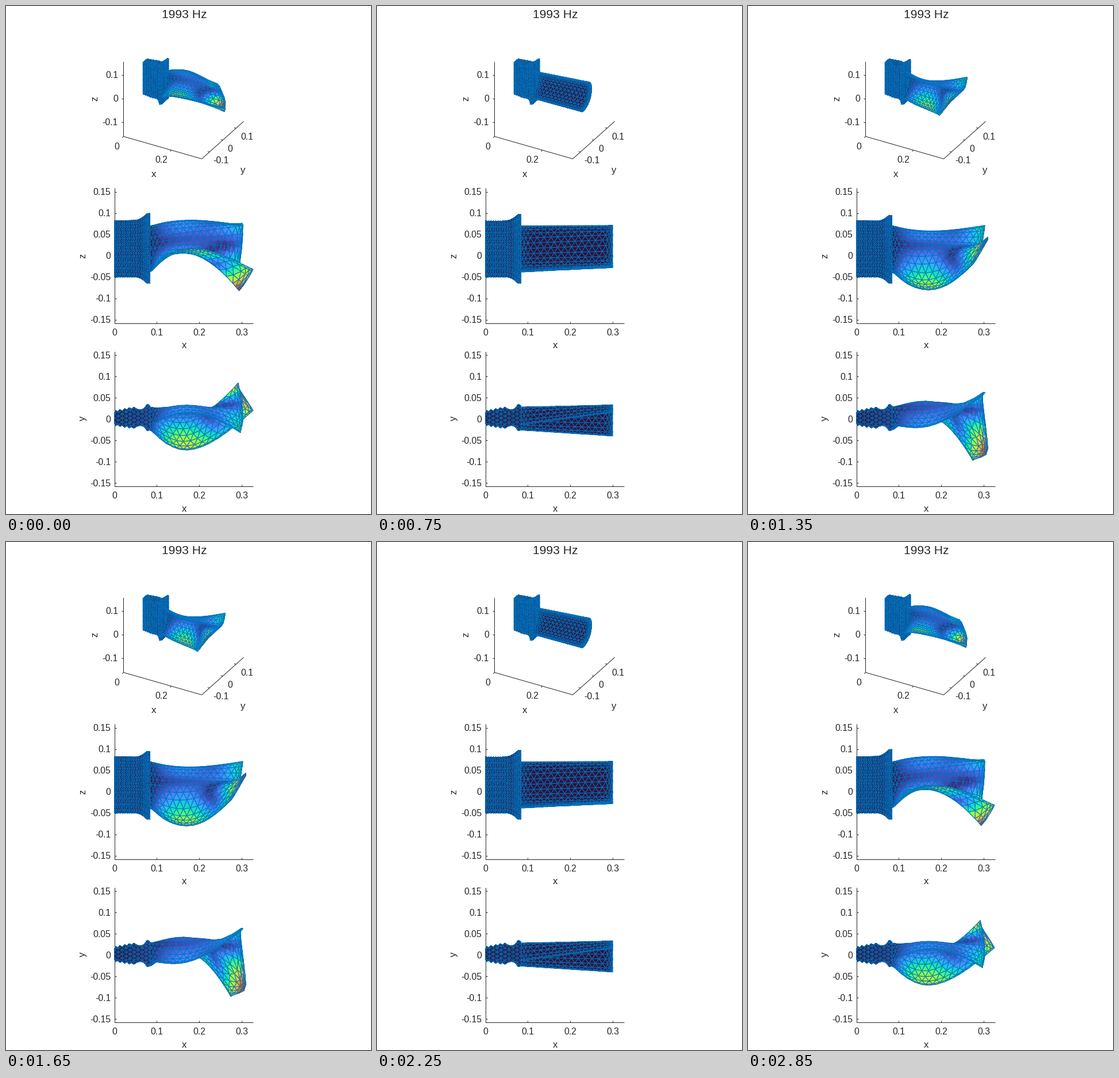
A matplotlib script for the animation above (3000 ms loop, 635 px wide and 882 px high).

```python
import numpy as np
import matplotlib.pyplot as plt
from matplotlib.animation import FuncAnimation
from matplotlib.collections import PolyCollection
from matplotlib.colors import to_rgba
from matplotlib.tri import Triangulation

W, H, DPI = 635, 882, 64
FRAMES, INTERVAL = 20, 150
PT = 72 / DPI  # points per pixel
INK = "#262626"
EDGE = to_rgba("#0072BD")
CLIM = 0.104  # displacement at the top of the colour map

plt.rcParams["font.family"] = "Liberation Sans"
fig = plt.figure(figsize=(W / DPI, H / DPI), dpi=DPI, facecolor="white")
ax = fig.add_axes([0, 0, 1, 1])
ax.set_xlim(0, W)
ax.set_ylim(H, 0)
ax.axis("off")


# ---------- geometry: root block ----------

X_ROOT = np.array([0, .003, .008, .013, .019, .024, .030, .035, .041, .046,
                   .052, .058, .064, .069, .073, .077, .080, .084])
HALF = np.array([.013, .018, .015, .020, .017, .022, .019, .024, .021, .025,
                 .021, .019, .019, .021, .025, .031, .031, .027])


def half_width(x):
    return np.interp(x, X_ROOT, HALF)


def mid_y(x):
    return 0.002 + 0.018 * x


def flare(x):
    return 0.0147 * np.clip((x - .048) / .029, 0, 1) ** 2


def z_top(x):
    return 0.082 + flare(x)


def z_low(x):
    return -0.050 - flare(x)


def grid(p):
    """Triangles of a (rows, cols, 3) lattice with zigzag diagonals."""
    rows, cols = p.shape[:2]
    n = np.arange(rows * cols).reshape(rows, cols)
    a, b, c, d = n[:-1, :-1], n[:-1, 1:], n[1:, 1:], n[1:, :-1]
    odd = (np.arange(rows - 1) % 2 == 1)[:, None]
    first = np.stack([a, b, np.where(odd, c, d)], -1).reshape(-1, 3)
    second = np.stack([np.where(odd, a, b), c, d], -1).reshape(-1, 3)
    return p.reshape(-1, 3), np.vstack([first, second])


def root_side():
    x, f = np.meshgrid(X_ROOT, np.linspace(0, 1, 20))
    z = z_low(x) + f * (z_top(x) - z_low(x))
    return grid(np.stack([x, mid_y(x) - half_width(x), z], -1))


def root_top():
    pts = [(x, mid_y(x) + k * half_width(x)) for x in X_ROOT for k in (-1, 1)]
    for i, x in enumerate(np.linspace(0, .084, 10)):
        for y in np.arange(-3, 4) * .0095 + .002 + .00475 * (i % 2):
            if abs(y - mid_y(x)) < half_width(x) - .003:
                pts.append((x, y))
    pts = np.array(pts)
    tris = Triangulation(*pts.T).triangles
    cx, cy = pts[tris].mean(1).T
    tris = tris[np.abs(cy - mid_y(cx)) <= half_width(cx) + 1e-6]
    u, v = pts[tris[:, 1]] - pts[tris[:, 0]], pts[tris[:, 2]] - pts[tris[:, 0]]
    flip = u[:, 0] * v[:, 1] < u[:, 1] * v[:, 0]
    tris[flip] = tris[flip][:, ::-1]
    return np.column_stack([pts, z_top(pts[:, 0])]), tris


def root_end():
    x = .084
    y = mid_y(x) + half_width(x) * np.linspace(-1, 1, 8)
    yy, zz = np.meshgrid(y, np.linspace(z_low(x), z_top(x), 18))
    return grid(np.stack([np.full_like(yy, x), yy, zz], -1))


def root_mode(p):
    d = np.zeros_like(p)
    d[:, 2] = .0025 * (p[:, 0] / .084) ** 2 * np.clip(p[:, 2] / .08, 0, 1)
    return d


# ---------- geometry: blade ----------

X0, X1 = .083, .300
S_SHAPE = [0, .3, .6, 1]
BASE_Y = np.polyfit(S_SHAPE, [-.026, .008, .024, -.014], 3)
BASE_Z = np.polyfit(S_SHAPE, [-.038, -.018, .015, .070], 3)
TIP_Y = np.polyfit(S_SHAPE, [-.040, .006, .028, .016], 3)
TIP_Z = np.polyfit(S_SHAPE, [-.026, -.013, .022, .071], 3)


def blade_point(x, s, side):
    u = (x - X0) / (X1 - X0)

    def blend(base, tip):
        return (1 - u) * np.polyval(base, s) + u * np.polyval(tip, s)

    ty = blend(np.polyder(BASE_Y), np.polyder(TIP_Y))
    tz = blend(np.polyder(BASE_Z), np.polyder(TIP_Z))
    h = side * .0042 * (4 * s * (1 - s)) ** .45 / np.hypot(ty, tz)
    return np.stack([x, blend(BASE_Y, TIP_Y) - h * tz,
                     blend(BASE_Z, TIP_Z) + h * ty], -1)


# Displacement along the chord, at mid span and at the tip.
S_MODE = np.linspace(0, 1, 6)
MID = np.array([[0, -.044, .050], [0, -.034, .038], [0, -.022, .016],
                [0, -.012, .006], [0, .010, .009], [0, .018, .013]])
TIP = np.array([[.027, .060, -.006], [-.007, .078, -.059], [-.008, .064, -.042],
                [0, .012, -.006], [.003, -.027, .022], [-.003, -.048, .000]])


def hermite(v, s):
    m = np.gradient(v, S_MODE, axis=0)
    i = np.clip(np.searchsorted(S_MODE, s, "right") - 1, 0, len(S_MODE) - 2)
    h = (S_MODE[i + 1] - S_MODE[i])[..., None]
    t = (s - S_MODE[i])[..., None] / h
    return (v[i] * (1 + 2 * t) * (1 - t) ** 2 + v[i + 1] * t ** 2 * (3 - 2 * t)
            + h * (m[i] * t * (1 - t) ** 2 - m[i + 1] * t ** 2 * (1 - t)))


def blade_mode(x, s):
    u = np.clip((x - X0) / (X1 - X0), 0, 1)
    belly = np.sin(np.pi * u ** .85) * (1 - np.exp(-u / .05))
    flap = np.clip((u - .3) / .7, 0, 1) ** 1.7
    d = belly[..., None] * hermite(MID, s) + flap[..., None] * hermite(TIP, s)
    return d.reshape(-1, 3)


def blade_parts():
    n = 14
    s = (1 - np.cos(np.pi * np.arange(n + 1) / n)) / 2
    loop = np.concatenate([s, s[-2::-1]])
    side = np.where(np.arange(2 * n + 1) <= n, 1, -1)
    xs = np.concatenate([[X0, .088, .095], np.linspace(.106, .284, 12),
                         [.292, .297, X1]])
    shifted = xs.copy()
    shifted[1:-1] = (xs[1:-1] + xs[2:]) / 2
    x = np.array([shifted if r % 2 else xs for r in range(2 * n + 1)])
    ss = np.repeat(loop[:, None], len(xs), 1)
    skin = grid(blade_point(x, ss, side[:, None]))
    yield (*skin, blade_mode(x, ss))

    x, ss = np.full((2, n + 1), X1), np.vstack([s, s])
    cap = grid(blade_point(x, ss, np.array([[-1], [1]])))
    yield (*cap, blade_mode(x, ss))


def build():
    parts = [(p, t, root_mode(p)) for p, t in (root_side(), root_top(), root_end())]
    parts += blade_parts()
    rest, faces, mode, count = [], [], [], 0
    for p, t, d in parts:
        rest.append(p)
        faces.append(t + count)
        mode.append(d)
        count += len(p)
    return np.vstack(rest), np.vstack(faces), np.vstack(mode)


REST, FACES, MODE = build()
SIZE = np.linalg.norm(MODE, axis=1) / CLIM


# ---------- views: pixel origin, projection, direction to the viewer ----------

LIM = .158
VIEWS = [
    (np.array([204.5 + 231 * LIM, 226.5 - 206 * LIM - 410 * LIM]),
     np.array([[416, 231, 0], [119, -206, -410]]), np.array([.42, -.76, .50])),
    (np.array([188.5, 433.5]),
     np.array([[738, 0, 0], [0, 0, -740]]), np.array([0, -1, 0])),
    (np.array([188.5, 717.0]),
     np.array([[738, 0, 0], [0, -740, 0]]), np.array([0, 0, 1])),
]
meshes = [PolyCollection([], joinstyle="round", zorder=3) for _ in VIEWS]
for mesh in meshes:
    ax.add_collection(mesh, autolim=False)


def split(t):
    """Cut each triangle into four through its edge midpoints."""
    a, b, c = t[:, 0], t[:, 1], t[:, 2]
    ab, bc, ca = (a + b) / 2, (b + c) / 2, (c + a) / 2
    quads = [(a, ab, ca), (ab, b, bc), (ca, bc, c), (ab, bc, ca)]
    return np.stack([np.stack(q, 1) for q in quads], 1).reshape(4 * len(t), 3, *t.shape[2:])


def paint(mesh, view, pos, value):
    origin, proj, eye = view
    tri = pos[FACES]
    normal = np.cross(tri[:, 1] - tri[:, 0], tri[:, 2] - tri[:, 0])
    seen = np.flatnonzero(normal @ eye > 1e-9)
    seen = seen[np.argsort(tri[seen].mean(1) @ eye)]

    flat = tri[seen] @ proj.T + origin
    level = value[FACES[seen]]
    rank = np.arange(len(seen))
    varied = np.ptp(level, axis=1) > .035

    fills = np.concatenate([flat[~varied], split(flat[varied])])
    levels = np.concatenate([level[~varied], split(level[varied])]).mean(1)
    keys = np.concatenate([2 * rank[~varied], np.repeat(2 * rank[varied], 4),
                           2 * rank + 1])
    order = np.argsort(keys, kind="stable")

    nf, ne = len(fills), len(flat)
    is_edge = np.arange(nf + ne) >= nf
    face = np.vstack([plt.cm.turbo(levels), np.zeros((ne, 4))])
    edge = np.vstack([np.zeros((nf, 4)), np.tile(EDGE, (ne, 1))])
    mesh.set_verts(np.concatenate([fills, flat])[order])
    mesh.set_facecolor(face[order])
    mesh.set_edgecolor(edge[order])
    mesh.set_linewidth((is_edge * 1.15 * PT)[order])
    mesh.set_antialiased(is_edge[order])


# ---------- axes and text ----------

TICK, LABEL, TITLE = 15.7, 16.8, 21


def line(*pts):
    ax.plot(*zip(*pts), color=INK, lw=PT, solid_capstyle="butt", zorder=1)


def text(x, y, s, size=TICK, ha="center", drop=5.6):
    ax.text(x, y + drop, s, size=size * PT, ha=ha, va="baseline", color=INK)


def label(x, y, s, turned=False):
    if turned:
        ax.text(x, y, s, size=LABEL * PT, ha="center", va="center",
                rotation=90, color=INK)
    else:
        text(x, y, s, LABEL, drop=4.4)


def flat_axes(y0, top, bottom, name):
    line((188.5, top), (188.5, bottom), (430, bottom))
    for k in range(4):
        x = 188.5 + 73.8 * k
        line((x, bottom), (x, bottom - 3))
        text(x, bottom + 15.5, f"{k / 10:g}")
    for k in range(-3, 4):
        y = y0 - 37 * k
        line((188.5, y), (191.5, y))
        text(182.5, y, f"{k / 20:g}", ha="right")
    label(310, bottom + 39.5, "x")
    label(134, y0, name, turned=True)


def space_axes():
    origin, proj, _ = VIEWS[0]

    def at(x, y, z):
        return origin + proj @ np.array([x, y, z])

    line(at(0, -LIM, LIM), at(0, -LIM, -LIM), at(.327, -LIM, -LIM),
         at(.327, LIM, -LIM))
    for x in (0, .2):
        p = at(x, -LIM, -LIM)
        line(p, p + (-2.3, 2.2))
        text(p[0] - 11.5 - 30 * x, p[1] + 16.5, f"{x:g}")
    for y, tx, ty in ((-.1, 374, 267), (0, 390, 247), (.1, 419, 226)):
        p = at(.327, y, -LIM)
        line(p, p + (-3, -1))
        text(tx, ty, f"{y:g}")
    for z in (-.1, 0, .1):
        p = at(0, -LIM, z)
        line(p, p + (-3, -.8))
        text(195, p[1] - 1, f"{z:g}", ha="right")
    label(257, 292.5, "x")
    label(411, 286, "y")
    label(155, 161, "z", turned=True)


text(310.5, 14, "1993 Hz", TITLE, drop=7.2)
space_axes()
flat_axes(433.5, 316, 550.5, "z")
flat_axes(717, 600, 834, "y")


def draw(i):
    amp = np.cos(2 * np.pi * i / FRAMES)
    pos = REST + amp * MODE
    value = np.abs(amp) * SIZE
    for mesh, view in zip(meshes, VIEWS):
        paint(mesh, view, pos, value)
    return meshes


anim = FuncAnimation(fig, draw, frames=FRAMES, interval=INTERVAL,
                     repeat=True, repeat_delay=0, blit=False)
plt.show()
```
